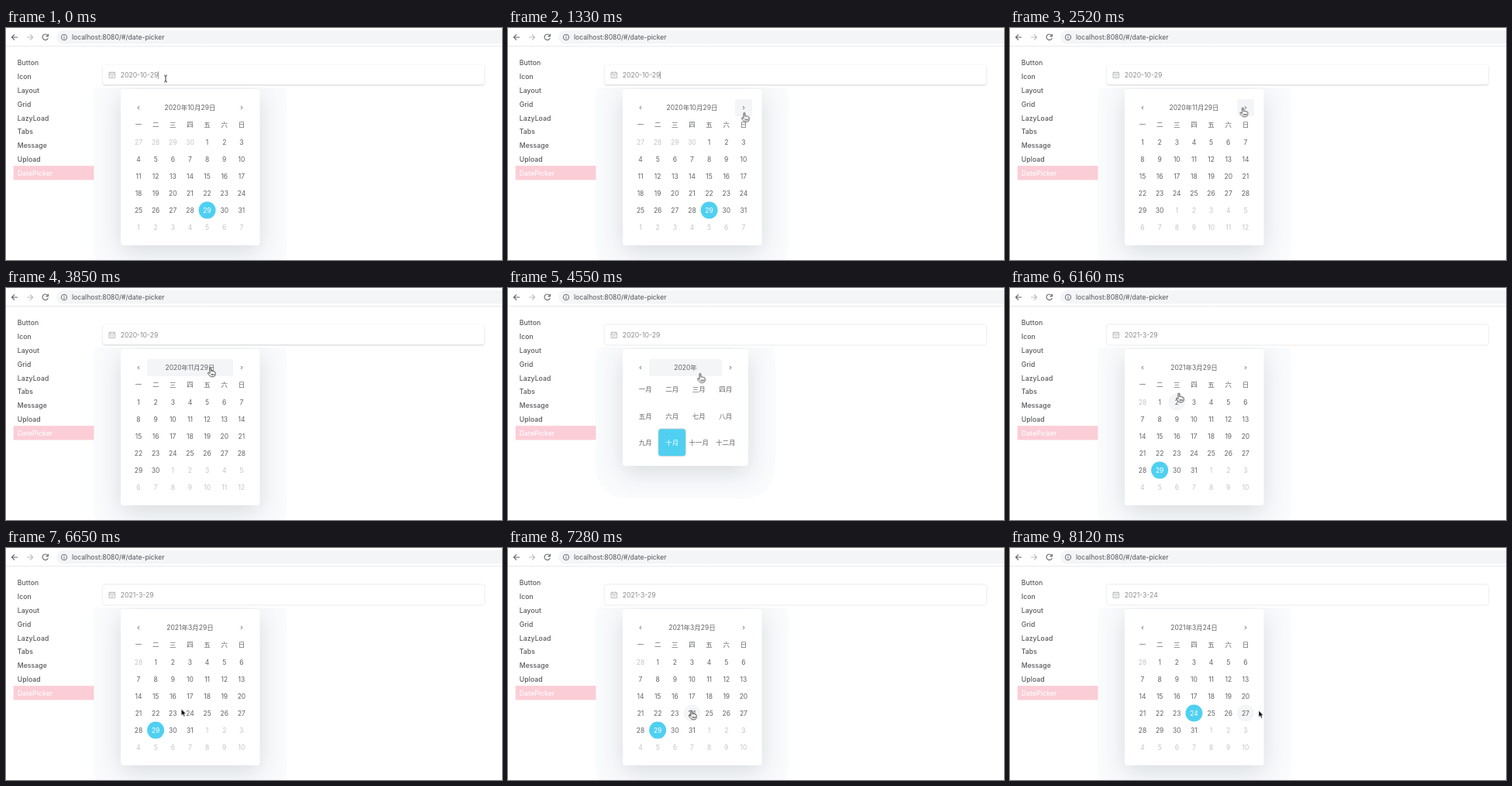
These frames come from a looping animation (640x300 px, 8190 ms). An HTML page:

```html
<!DOCTYPE html>
<html lang="zh">
<head>
<meta charset="utf-8">
<title>Date picker</title>
<style>
html, body { margin: 0; width: 100%; height: 100%; overflow: hidden; background: #fff; }
svg { display: block; width: 640px; height: 300px; }
text { font: 8.5px Inter, "Noto Sans CJK SC", "Noto Sans CJK JP", "Noto Sans CJK", sans-serif; fill: #606266; }
.mid { text-anchor: middle; }
.muted { fill: #c3c4c7; }
.white { fill: #fff; }
.url { font-size: 8.65px; fill: #505357; }
.item { font-size: 8.6px; font-weight: 500; letter-spacing: .08px; fill: #55575a; }
.value { font-size: 8.65px; fill: #8a8c90; }
.line { fill: none; stroke: #5f6368; stroke-width: 1.1; }
.hover { fill: #f4f5f7; }
.on { fill: #4fd0f1; }
.panel { fill: #fff; filter: drop-shadow(0 8px 16px rgba(30, 32, 40, .15)); }
.box { fill: #fff; filter: drop-shadow(0 .5px .8px rgba(0, 0, 0, .17)); }
.focus { fill: #fff; filter: drop-shadow(0 1.5px 1.2px rgba(0, 0, 0, .18)); }
</style>
</head>
<body>
<svg id="stage" viewBox="0 0 640 300"></svg>
<script>
const LOOP = 8190;
const stage = document.getElementById('stage');

function add(parent, tag, attrs = {}, text = '') {
  const el = document.createElementNS('http://www.w3.org/2000/svg', tag);
  for (const key in attrs) el.setAttribute(key, attrs[key]);
  el.textContent = text;
  return parent.appendChild(el);
}
const group = parent => add(parent, 'g');
const rect = (g, x, y, width, height, rx, cls) =>
  add(g, 'rect', { x, y, width, height, rx, class: cls });
const path = (g, d, attrs) => add(g, 'path', { d, ...attrs });
// y is the optical middle of the line
const label = (g, s, x, y, cls = '') => add(g, 'text', { x, y: y + 3.1, class: cls }, s);

function play(el, frames) {
  el.animate(frames, { duration: LOOP, iterations: Infinity }).startTime = 0;
}
// Visible only during the given [from, to] spans
function show(el, ...spans) {
  const key = (t, opacity) => ({ offset: t / LOOP, opacity, easing: 'step-end' });
  const frames = spans[0][0] > 0 ? [key(0, 0)] : [];
  for (const [from, to] of spans) frames.push(key(from, 1), key(to, 0));
  if (spans.at(-1)[1] < LOOP) frames.push(key(LOOP, 0));
  play(el, frames);
  return el;
}

// Browser bar
function drawBar(g) {
  rect(g, 65, 3, 590, 17.5, 8.7).setAttribute('fill', '#f4f5f7');
  path(g, 'M0 23.5H640', { stroke: '#e9ebed', fill: 'none' });
  path(g, 'M15 12H7.6M11 8.4L7.4 12 11 15.6', { class: 'line' });
  path(g, 'M27 12H34.4M31 8.4L34.6 12 31 15.6', { class: 'line', style: 'stroke:#b9bbbe' });
  path(g, 'M53.6 9.4A3.7 3.7 0 1 0 54.3 12.8M54.4 7.8V10.6H51.5', { class: 'line' });
  add(g, 'circle', { cx: 75, cy: 12, r: 3.7, class: 'line', style: 'stroke-width:.9' });
  path(g, 'M75 11.4V14.2M75 9.7V10.6', { class: 'line', style: 'stroke-width:.9' });
  label(g, 'localhost:8080/#/date-picker', 85, 12, 'url');
}

function drawMenu(g) {
  const items = ['Button', 'Icon', 'Layout', 'Grid', 'LazyLoad', 'Tabs', 'Message', 'Upload', 'DatePicker'];
  rect(g, 9.7, 178.2, 103.7, 18.3, 0).setAttribute('fill', '#fbcdd7');
  items.forEach((name, i) => {
    const el = label(g, name, 14.8, 45 + i * 17.85, 'item');
    if (i === 8) el.style.fill = '#fff';
  });
}

function drawInput(g) {
  rect(g, 113.5, 25, 526, 52, 0, 'white');
  show(rect(g, 125, 47.5, 492, 25.5, 3, 'focus'), [0, 3990]);
  show(rect(g, 125, 47.5, 492, 26, 3, 'box'), [3990, LOOP]);
  path(g, 'M133 57.5H140.6V64.5H133ZM133 59.8H140.6M134.9 56.3V58.3M138.7 56.3V58.3M134.6 62.1H139',
    { class: 'line', style: 'stroke:#a9abae;stroke-width:.8' });
  const values = [['2020-10-29', 0, 5320], ['2020-2-29', 5320, 6160],
    ['2021-3-29', 6160, 7420], ['2021-3-24', 7420, LOOP]];
  for (const [value, from, to] of values) show(label(g, value, 147.7, 61, 'value'), [from, to]);
  show(path(g, 'M196.6 56V66', { stroke: '#888', 'stroke-width': .8 }),
    [0, 490], [1050, 1610], [2100, 2450]);
}

// Panel body and header text; returns the hover layer
function drawPanel(g, title, width, height, next) {
  add(g, 'rect', { x: 113, y: 51, width: width + 70, height: height + 70, rx: 39, fill: '#f9fbfd' });
  rect(g, 148, 79, width, height, 3.5, 'panel');
  const hovers = group(g);
  path(g, 'M172 101L170 103.1 172 105.2', { class: 'line', style: 'stroke-width:.9' });
  path(g, `M${next - 1} 101L${next + 1} 103.1 ${next - 1} 105.2`, { class: 'line', style: 'stroke-width:.9' });
  label(g, title, (171 + next) / 2, 103, 'mid');
  return hovers;
}

const dayX = i => 171 + (i % 7) * 22.15;
const dayY = i => 147.2 + Math.floor(i / 7) * 22.1;

function drawDays(span, title, first, prevDays, days, picked) {
  const g = show(group(panels), span);
  const hovers = drawPanel(g, title, 179.5, 202, 304);
  [...'一二三四五六日'].forEach((s, i) => label(g, s, dayX(i), 125, 'mid'));
  const over = group(g);
  for (let i = 0; i < 42; i++) {
    const n = i - first + 1;
    const inside = n > 0 && n <= days;
    const x = dayX(i), y = dayY(i);
    if (n === picked) add(g, 'circle', { cx: x, cy: y, r: 11, class: 'on' });
    const text = inside ? n : n < 1 ? n + prevDays : n - days;
    label(g, text, x, y + .2, 'mid ' + (n === picked ? 'white' : inside ? '' : 'muted'));
  }
  return {
    header: (x, w, ...s) => show(rect(hovers, x, 92, w, 22, 2, 'hover'), s),
    day: (n, ...s) => {
      const i = n + first - 1;
      show(add(over, 'circle', { cx: dayX(i), cy: dayY(i), r: 11, class: 'hover' }), s);
    }
  };
}

function drawGrid(span, title, names, picked, ring) {
  const g = show(group(panels), span);
  const hovers = drawPanel(g, title, 162, 151, 287);
  const left = i => 159.9 + (i % 4) * 34.5;
  const top = i => 113.6 + Math.floor(i / 4) * 34.5;
  names.forEach((name, i) => {
    if (i === picked) {
      const cell = rect(g, left(i), top(i), 34.5, 34.5, 3, 'on');
      if (ring) cell.style.filter = 'drop-shadow(0 0 1px rgba(0,0,0,.4))';
    }
    label(g, name, left(i) + 17.3, top(i) + 17.4, i === picked ? 'mid white' : 'mid');
  });
  return {
    header: (...s) => show(rect(hovers, 182, 92, 94, 22, 3, 'hover'), s),
    cell: (i, ...s) => show(rect(hovers, left(i), top(i), 34.5, 34.5, 3, 'hover'), s)
  };
}

function drawCursor(g) {
  const moves = [
    [0, 206, 65.5], [840, 206, 65.5], [1190, 313, 89], [1330, 305, 109.5], [1680, 300.5, 103],
    [3500, 300.5, 103], [3850, 264, 103], [4270, 264, 103], [4550, 248, 110.5], [5110, 214.5, 130.5],
    [5460, 214.5, 130.5], [5740, 238, 127.5], [6020, 218, 136], [6370, 218, 136],
    [6650, 226.3, 208.3], [7140, 237, 210], [7840, 237, 210], [8120, 321, 210.3], [LOOP, 321, 210.3]
  ];
  play(g, moves.map(([t, x, y]) => ({
    offset: t / LOOP, transform: `translate(${x}px, ${y}px)`, easing: 'ease-in-out'
  })));
  const beam = path(g, 'M-2-4.3Q0-4.3 0-2.9Q0-4.3 2-4.3M0-3V3M-2 4.3Q0 4.3 0 2.9Q0 4.3 2 4.3',
    { fill: 'none', stroke: '#222', 'stroke-width': .9 });
  const arrow = path(g, 'M0 0V8.3L1.9 6.6 3.2 9.6 4.6 9 3.3 6.1H5.8Z',
    { fill: '#000', stroke: '#fff', 'stroke-width': .5 });
  const hand = path(g, 'M-1 .9C-1-.3 .9-.3 .9 .9V4.6C1.5 3.9 2.7 4.1 2.8 4.9 3.4 4.4 4.5 4.6 4.6 5.4 ' +
    '5.3 5.1 6.2 5.4 6.2 6.4V8.5C6.2 10.3 5 11.8 3.5 11.8H1.2C-.2 11.8-1.2 10.4-3.4 7.6-4 6.6-2.8 6-2 6.6L-1 7.6Z' +
    'M1.1 8V10M2.7 8V10M4.3 8V10', { fill: '#fff', stroke: '#222', 'stroke-width': .8 });
  show(beam, [0, 980]);
  show(arrow, [980, 1260], [6580, 6720], [8050, LOOP]);
  show(hand, [1260, 6580], [6720, 8050]);
}

const panels = group(stage);
drawBar(group(stage));
drawMenu(group(stage));
drawInput(group(stage));

const october = drawDays([0, 2450], '2020年10月29日', 4, 30, 31, 29);
october.header(293, 22, 1260, 2450);

const november = drawDays([2450, 3990], '2020年11月29日', 0, 31, 30, 0);
november.header(293, 22, 2450, 3640);
november.header(182, 111, 3640, 3990);

const monthNames = ['一', '二', '三', '四', '五', '六', '七', '八', '九', '十', '十一', '十二'].map(s => s + '月');
const months = drawGrid([3990, 5320], '2020年', monthNames, 9, true);
months.header(3990, 4690);
months.cell(2, 4690, 4830);
months.cell(1, 4830, 5320);

const yearNames = Array.from({ length: 10 }, (_, i) => 2020 + i);
const years = drawGrid([5320, 6160], '2020-2029', yearNames, 0);
years.cell(1, 5320, 5600);
years.cell(2, 5600, 5880);
years.cell(1, 5880, 6160);

const march = drawDays([6160, 7420], '2021年3月29日', 1, 28, 31, 29);
march.day(2, 6160, 6480);
march.day(9, 6480, 6510);
march.day(16, 6510, 6580);
march.day(24, 6790, 7420);

const final = drawDays([7420, LOOP], '2021年3月24日', 1, 28, 31, 24);
final.day(25, 7945, 7980);
final.day(26, 7980, 8020);
final.day(27, 8020, LOOP);

drawCursor(group(stage));
</script>
</body>
</html>
```
